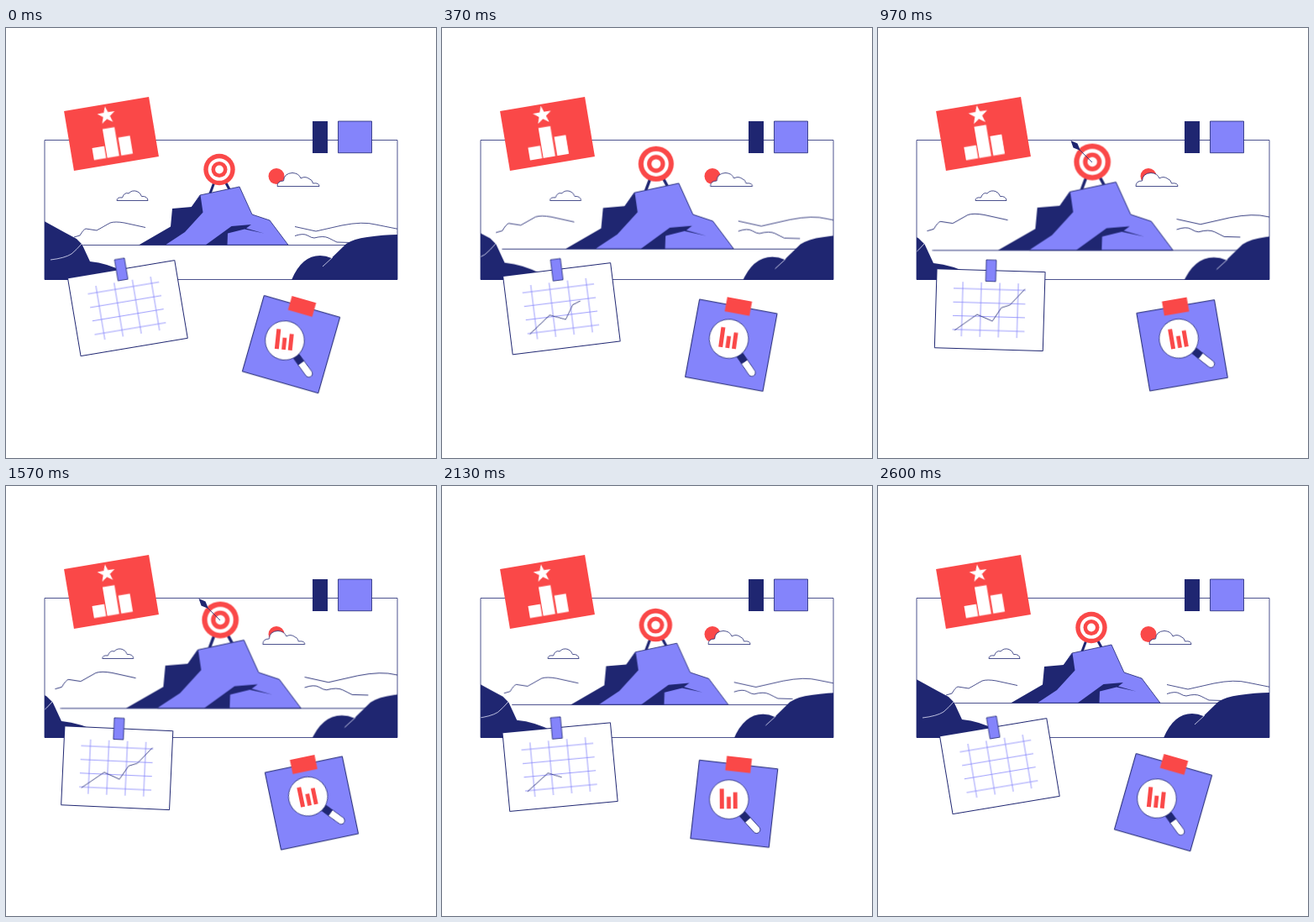
Write an HTML page without scripts that moves like this. It is 512 px wide and 512 px high and loops after 2630 ms.

```html
<!DOCTYPE html>
<html lang="en">
<head>
<meta charset="utf-8">
<title>Goal board</title>
<style>
  :root { --red: #fa4848; --lilac: #8484fb; --navy: #1f2671; }
  html, body { margin: 0; width: 100%; height: 100%; overflow: hidden; background: #fff; }
  svg { display: block; width: 100vw; height: 100vh; }

  .red { fill: var(--red); }
  .lilac { fill: var(--lilac); }
  .navy { fill: var(--navy); }
  .white { fill: #fff; }
  .line { fill: none; }
  .edge, .line { stroke: var(--navy); stroke-width: .8; }
  .grid { fill: none; stroke: var(--lilac); stroke-width: .8; }
  .glint { fill: none; stroke: #e4e5fa; stroke-width: .8; }
  .leg { stroke: var(--navy); stroke-width: 3; }
  .sheet { stroke-width: 1; }

  /* Slow back-and-forth drift */
  .swing { transform: var(--from, none); animation: swing 1315ms cubic-bezier(.37, 0, .63, 1) infinite alternate; }
  @keyframes swing {
    from { transform: var(--from, none); }
    to { transform: var(--to); }
  }

  /* Camera push in, hold, pull out */
  .push { animation: push 2630ms cubic-bezier(.33, 0, .2, 1) infinite; }
  @keyframes push {
    0%, 99.2%, 100% { transform: var(--from, none); }
    30.4%, 68% { transform: var(--to); }
  }

  .clouds { --to: translate(-19px, 0); }
  .ridges { --to: scale(1.13); transform-origin: 254px 305px; }
  .peak { --to: scale(1.17); transform-origin: 247px 222px; }
  .left-hill { --to: scale(1.1); transform-origin: 440px 258px; }
  .right-hill { --to: scale(1.1); transform-origin: 115px 250px; }
  .calendar { --from: rotate(-9.5deg); --to: rotate(3.8deg); transform-origin: 128.5px 275px; }
  .note { --from: rotate(16deg); --to: rotate(-14.5deg); transform-origin: 353.6px 327.7px; }
  .lens { --from: translate(345px, 376.3px) rotate(-10deg); --to: translate(351px, 370px) rotate(0deg); }

  .trend { stroke-dasharray: 1.01 3; animation: trend 2630ms cubic-bezier(.33, 0, .2, 1) infinite; }
  @keyframes trend {
    0%, 99.2%, 100% { stroke-dashoffset: 1.01; }
    30.4%, 71.5% { stroke-dashoffset: 0; }
  }

  .arrow { animation: arrow 2630ms ease-in infinite; }
  @keyframes arrow {
    0%, 26%, 71%, 100% { transform: translate(-42px, -42px); }
    32%, 64.5% { transform: none; }
  }

  .bars { transform-origin: 125px 153.6px; --grow: scaleY(1.08); }
  .star { transform-origin: 123.2px 103.3px; --grow: translate(0, -.5px) scale(1.08); }
  .bars, .star { animation: grow 2630ms ease-in-out infinite; }
  @keyframes grow {
    0%, 8%, 60%, 100% { transform: none; }
    21%, 45% { transform: var(--grow); }
  }
</style>
</head>
<body>
<svg viewBox="0 0 512 512">
  <clipPath id="view"><path d="M46 133H466V300H46Z"/></clipPath>

  <g clip-path="url(#view)">
    <g class="ridges push line">
      <path d="M81 249 88 247Q92 240 95 239L108 241 124 232Q130 230 141 232L166 237.500"/>
      <path d="M344 236.500 369 242 400 235Q425 230 440 234L480 242"/>
      <path d="M344 247.500Q354 244 359 247T367 250Q378 247 384 250T394 255L411 255.500"/>
    </g>

    <circle class="red" cx="322" cy="176.500" r="9.500"/>
    <g class="clouds swing white edge">
      <path d="M132 205.500Q132 201 138.500 202 141 195 146 197 150 192.500 156 194.500 160 196 161.500 200.500 168.500 200 169 205.500Z"/>
      <path d="M323 188.500Q323 182 330.500 182 331 173 341 172.500 349 173 351 179 356 176 361 179.500 365 181 365.500 185 373 184 373 188.500Z"/>
    </g>

    <g class="peak push">
      <path class="line" d="M91.400 258.500H480"/>
      <path class="leg" d="M249 181 243 197M260 181 267 194"/>
      <path class="lilac edge" d="M231 199 278 189 293 222 314 229 336 258.300H190Z"/>
      <path class="navy" d="M158 258.500 196 236.500 198 215 221 213 231.500 199 234.500 219.500 213 243 189.500 258.500Z"/>
      <path class="navy" d="M237.500 258.500 268.500 236 292 234 286 238.500 307 244.500 284 239.500 264 244.500 263.500 258.500Z"/>
      <circle class="red" cx="254" cy="168.500" r="18.700"/>
      <circle class="white" cx="254" cy="168.500" r="13.300"/>
      <circle class="red" cx="254" cy="168.500" r="9.500"/>
      <circle class="white" cx="254" cy="168.500" r="4.900"/>
    </g>

    <g class="arrow">
      <path class="line" d="M236 141 255 160"/>
      <path class="navy" d="M229.500 134 237.500 137.500 241 146 232.500 142.500Z"/>
    </g>

    <g class="left-hill push">
      <path class="navy" d="M40 227 70 243.500 84 251 90.500 257.500 100 278Q121 280 142 291L160 300V320H0V227Z"/>
      <path class="glint" d="M53 276Q70 274 78 269 84 264 90 257"/>
    </g>
    <g class="right-hill push">
      <path class="navy" d="M330 320 340 300Q352 271 374 271 381 271 387.500 274L405 257Q414 251 430 249 450 246 466 246V320Z"/>
      <path class="glint" d="M377 284 389 273"/>
    </g>
  </g>
  <path class="line" d="M46 133.500H466V299.500H46Z"/>

  <path class="navy" d="M365 111H383V149H365Z"/>
  <path class="lilac edge" d="M395.500 111H435.500V148.700H395.500Z"/>

  <g transform="rotate(-9.500 125.500 126)">
    <path class="red" d="M74.300 90H176.700V162H74.300Z"/>
    <path class="bars white" d="M100 139H114.600V153.600H100ZM116 118.800H130.400V153.600H116ZM132.800 131.800H146.800V153.600H132.800Z"/>
    <path class="star white" d="M123.200 92.400 125.700 99.700 133.700 99.900 127.300 104.700 129.700 112.300 123.200 107.700 116.700 112.300 119.100 104.700 112.700 99.900 120.700 99.700Z"/>
  </g>

  <g class="calendar swing">
    <path class="white edge sheet" d="M70.500 288.500H199.500V382.500H70.500Z"/>
    <path class="grid" d="M91 311H177M91 327.300H177M91 343.600H177M91 360H177M102 303V368M124 303V368M146 303V368M168 303V368"/>
    <path class="line trend" pathLength="1" d="M93.700 361 120 341.300 138.300 348.800 148.800 332.400 158.700 329 176 309.500"/>
    <path class="lilac edge" d="M129 276H141V301.500H129Z"/>
  </g>

  <g class="note swing">
    <path class="lilac edge sheet" d="M306.600 331.700H400.600V425.700H306.600Z"/>
    <path class="red" d="M338.600 323H368.600V340.300H338.600Z"/>
    <g class="lens push">
      <g transform="rotate(48)">
        <path class="navy" d="M22-4.500H34V4.500H22Z"/>
        <path class="white edge" d="M33-4.300H48.700A4.300 4.300 0 0 1 48.700 4.300H33Z"/>
      </g>
      <circle class="white edge" r="23.300"/>
      <path class="red" d="M-11-12.700H-6V11H-11ZM-2.700-3.200H2.100V11H-2.700ZM5-8.400H9.900V11H5Z"/>
    </g>
  </g>
</svg>
</body>
</html>
```
